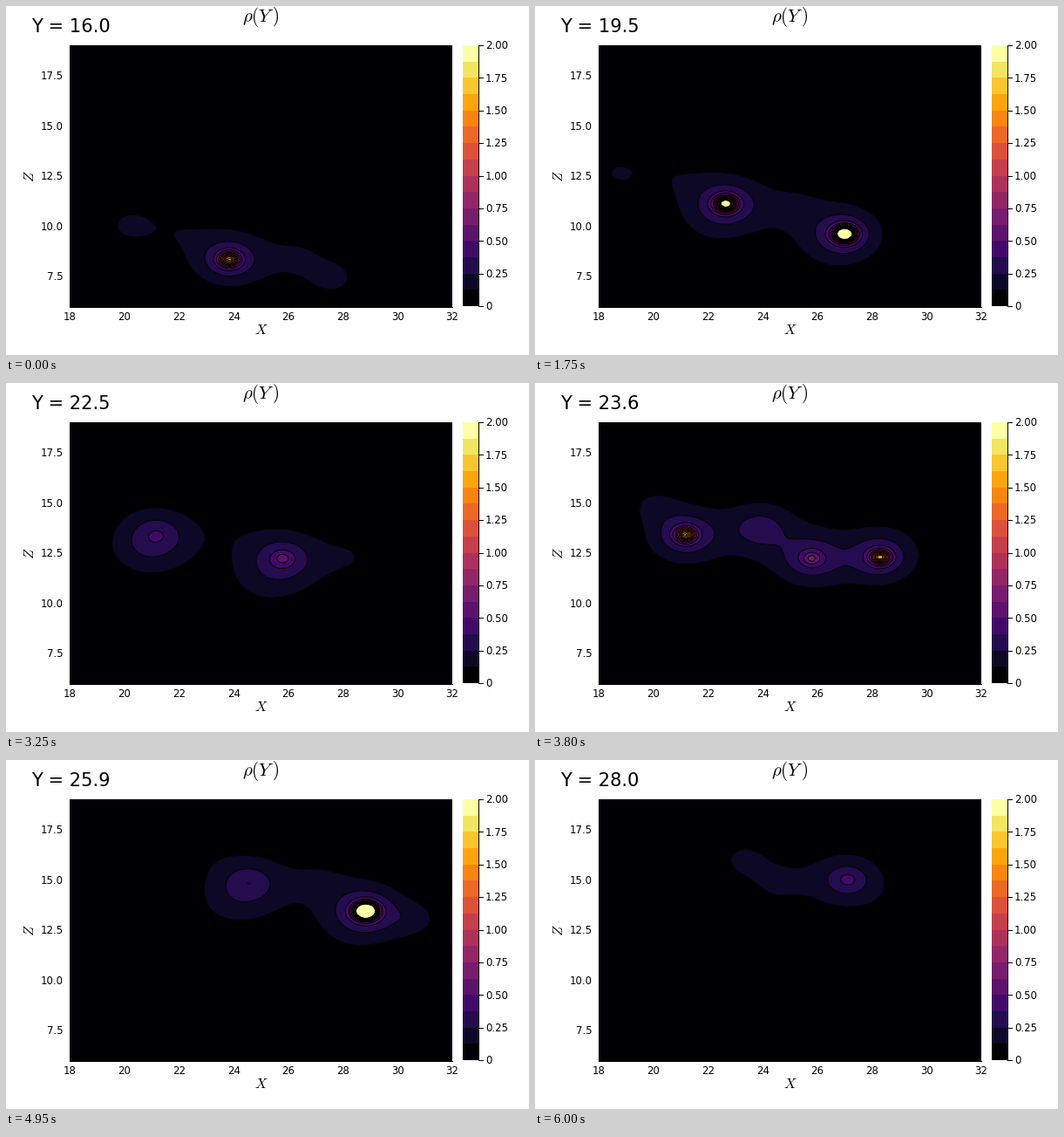
A matplotlib script for the animation above (6050 ms loop, 600 px wide and 400 px high).

```python
import numpy as np
import matplotlib.pyplot as plt
from matplotlib.animation import FuncAnimation
from matplotlib.patches import Rectangle

W, H, DPI = 600, 400, 100
PX = 72 / DPI
FRAMES = 121
LEVELS = np.linspace(0, 2, 17)
COLORS = plt.get_cmap("inferno")(np.linspace(0, 1, 16))

plt.rcParams.update({"font.family": "DejaVu Sans", "mathtext.fontset": "cm"})

# Electron density of a flat molecule, cut by a plane that sweeps along Y.
# Atom positions are (x, z, y).
HEAVY = [
    (23.84, 8.35, 16.37), (22.00, 9.75, 17.60), (26.36, 8.45, 17.42),
    (22.65, 11.13, 19.80), (27.00, 9.62, 19.72), (25.14, 10.98, 20.95),
    (20.73, 12.53, 21.12), (21.19, 13.42, 23.22), (25.80, 12.24, 23.07),
    (28.30, 12.30, 23.98), (23.90, 13.74, 24.35), (28.83, 13.45, 25.90),
    (24.56, 14.85, 26.63), (27.12, 15.02, 27.38),
]
HYDROGEN = [
    (27.65, 7.40, 16.70), (20.20, 10.05, 16.70), (18.70, 12.65, 20.30),
    (20.02, 14.90, 24.40), (30.60, 13.05, 26.60), (23.30, 16.05, 27.25),
]

X, Z = np.meshgrid(np.linspace(18, 32, 101), np.linspace(6, 19, 101))


def density(y):
    rho = np.zeros_like(X)
    for atoms, height, width, core in ((HEAVY, .5, .65, 6), (HYDROGEN, .3, .5, 0)):
        for ax_, az, ay in atoms:
            r = np.sqrt((X - ax_) ** 2 + (Z - az) ** 2 + (y - ay) ** 2)
            rho += height / np.cosh(r / width) + core * np.exp(-(r / .3) ** 2)
    return rho


fig = plt.figure(figsize=(W / DPI, H / DPI), dpi=DPI, facecolor="white")


def panel(x0, y0, x1, y1):
    return fig.add_axes([x0 / W, 1 - y1 / H, (x1 - x0) / W, (y1 - y0) / H])


def label(x, y, text, size, ha="center", va="baseline", **kw):
    return fig.text(x / W, 1 - y / H, text, fontsize=size * PX, color="black",
                    ha=ha, va=va, **kw)


TOP, BOTTOM = 45.5, 344.5
ax = panel(73, TOP, 512, BOTTOM)
ax.set(xlim=(18, 32), ylim=(6, 19), xticks=[], yticks=[], facecolor=COLORS[0])
for side, spine in ax.spines.items():
    spine.set_visible(side in ("left", "bottom"))
    spine.set_linewidth(PX)

TICK = 11.7
for v in range(18, 33, 2):
    label(73 + (v - 18) * 439 / 14, 359.8, str(v), TICK)
for v in np.arange(7.5, 18, 2.5):
    label(65.5, BOTTOM - (v - 6) * 23 + 4.3, f"{v:.1f}", TICK, ha="right")

label(292, 17.8, r"$\rho(Y\,)$", 20.9)
label(292.5, 376.3, "$X$", 16)
label(27.5, 195, "$Z$", 16, va="center", rotation=90)
title = label(29.5, 30.3, "", 21, ha="left")

bar = panel(524, TOP - .5, 542, BOTTOM - .5)
bar.set(xlim=(0, 1), ylim=(0, 2))
bar.axis("off")
for lo, c in zip(LEVELS, COLORS):
    bar.add_patch(Rectangle((0, lo), 1, .125, color=c, lw=0))
bar.plot([1, 1], [0, 2], color="black", lw=PX, clip_on=False)
for v in LEVELS[::2]:
    bar.plot([1, 1.3], [v, v], color="black", lw=PX, clip_on=False)
    label(550, BOTTOM - v * 149.5 + 3.8, f"{v:.2f}" if v else "0", TICK, ha="left")

drawn = []


def update(i):
    while drawn:
        drawn.pop().remove()
    y = 16 + i / 10
    rho = density(y)
    title.set_text(f"Y = {y:.1f}")
    drawn.append(ax.contourf(X, Z, rho, LEVELS, extend="max",
                             colors=[*COLORS, COLORS[-1]]))
    drawn.append(ax.contour(X, Z, rho, LEVELS[1:], colors="black", linewidths=PX))
    return [title, *drawn]


anim = FuncAnimation(fig, update, frames=FRAMES, interval=50, repeat=True,
                     repeat_delay=0, init_func=lambda: [title],
                     cache_frame_data=False)
plt.show()
```
